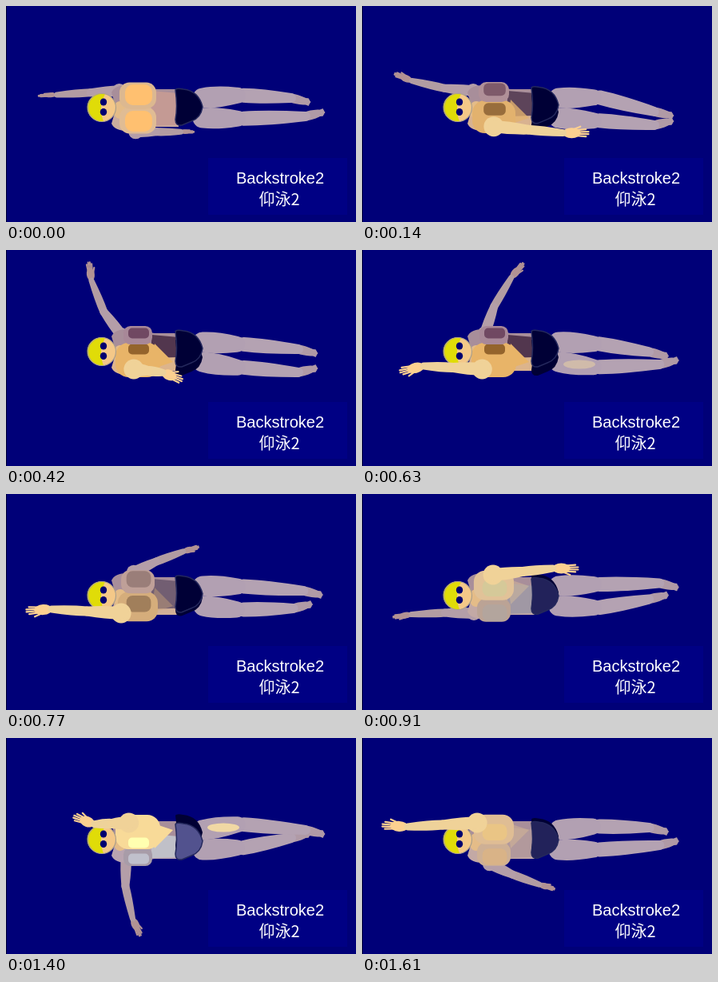
These frames come from a looping animation (438 px wide and 270 px high, 1.68 s). An HTML page:

```html
<!DOCTYPE html>
<html lang="en">
<head>
<meta charset="utf-8">
<title>Backstroke2</title>
<style>
html, body { margin: 0; width: 100%; height: 100%; overflow: hidden; background: #000078; }
svg { display: block; width: 100vw; height: 100vh; }
text { fill: #fff; text-anchor: middle; font-size: 20px; }
</style>
</head>
<body>
<svg viewBox="0 0 438 270">
  <rect width="438" height="270" fill="#000078"/>
  <rect width="1" height="270" fill="#000038"/>
  <rect x="253" y="190" width="174" height="71" fill="#000084"/>
  <text x="343" y="222" font-family="Arial, 'Liberation Sans', sans-serif">Backstroke2</text>
  <text x="342" y="249" font-family="'Noto Sans CJK SC', 'Noto Sans CJK', sans-serif">仰泳2</text>
  <g id="swimmer"></g>
</svg>
<script>
const STEP = 70, COUNT = 24, HALF = 12, TAU = Math.PI * 2;
const swimmer = document.getElementById('swimmer');
const { sin, cos, abs, hypot, min, max, PI } = Math;

// ankle height at every second step
const kick = [115, 132, 117, 124, 130, 125, 117, 106, 97, 102, 115, 109];

const f = n => +n.toFixed(1);
const clamp = (v, lo, hi) => min(hi, max(lo, v));
const bump = (k, at, width) => {
  const d = abs(k - at);
  return max(0, 1 - min(d, COUNT - d) / width);
};
function mix(a, b, u) {
  const part = (h, i) => parseInt(h.substr(1 + i * 2, 2), 16);
  return '#' + [0, 1, 2].map(i =>
    Math.round(part(a, i) + (part(b, i) - part(a, i)) * u).toString(16).padStart(2, '0')).join('');
}

const path = (d, fill, extra = '') => `<path d="${d}" fill="${fill}" ${extra}/>`;
const oval = (x, y, rx, ry, fill, extra = '') =>
  `<ellipse cx="${f(x)}" cy="${f(y)}" rx="${f(rx)}" ry="${f(ry)}" fill="${fill}" ${extra}/>`;
const line = (a, b, w, c) =>
  `<path d="M${a.map(f)}L${b.map(f)}" stroke="${c}" stroke-width="${w}" stroke-linecap="round"/>`;
const pad = (x, y, w, h, fill) =>
  `<rect x="${f(x - w / 2)}" y="${f(y - h / 2)}" width="${f(w)}" height="${f(h)}" rx="${f(min(w, h) * .38)}" fill="${fill}"/>`;
const mirror = s => `<g transform="matrix(1 0 0 -1 0 255)">${s}</g>`;

// point at share u of the way from a to b, moved sideways by s
function along(a, b) {
  const dx = b[0] - a[0], dy = b[1] - a[1], len = hypot(dx, dy) || 1;
  return (u, s = 0) => [f(a[0] + dx * u - dy / len * s), f(a[1] + dy * u + dx / len * s)];
}
function bone(a, b, w, w2, fill) {
  const at = along(a, b), r = w / 2, r2 = w2 / 2, m = (r + r2) / 2 + w * .13;
  return path(`M${at(0, r)}Q${at(.4, m)} ${at(1, r2)}A${r2} ${r2} 0 0 0 ${at(1, -r2)}` +
    `Q${at(.4, -m)} ${at(0, -r)}A${r} ${r} 0 0 0 ${at(0, r)}Z`, fill);
}
function hand(a, b, spread, fill) {
  const at = along(a, b), len = hypot(b[0] - a[0], b[1] - a[1]);
  const [x, y] = at(.32), turn = f(Math.atan2(b[1] - a[1], b[0] - a[0]) * 180 / PI);
  let out = oval(x, y, len * .34, 2.8 + 5 * spread, fill, `transform="rotate(${turn} ${x} ${y})"`);
  for (let i = -1.5; i < 2; i++)
    out += line(at(.45, i * (.7 + 2 * spread)), at(.97 - .05 * i * i, i * (.7 + 3 * spread)), 2.2, fill);
  return out + line(at(.2, 2), at(.65, 2 + 8 * spread), 2.2, fill);
}

// pull below the body as a turning chain, then a foreshortened swing over it
function armPose(k) {
  const x = 152 - 13 * cos(TAU * (k - 2.5) / COUNT);
  const y = 106 - 10 * bump(k, 11.5, 3);
  const reach = 1 - .28 * bump(k, HALF, 2);
  const joints = [[x, y]];
  const add = (dx, dy) => {
    const [px, py] = joints[joints.length - 1];
    joints.push([px + dx, py + dy]);
  };
  if (k <= HALF) {
    const turn = (len, ease) => {
      const angle = PI * 1.02 * (1 - (k / HALF) ** ease);
      add(len * reach * cos(angle), -len * reach * sin(angle));
    };
    turn(36, 1.7);
    turn(42, 1.35);
    turn(24, 1.1);
  } else {
    const w = clamp((k - 15.6) / 6.6, 0, 1), c = cos(PI * w);
    const drop = 2.5 - 3.25 * (1 + c);
    add(43 * reach * c, drop);
    add(44 * reach * c, drop);
    add((c < 0 ? -1 : 1) * (20 + 13 * abs(c)), -10 * sin(PI * w) - 2 * w);
  }
  return joints;
}
function arm(k) {
  const lit = k > HALF, [s, e, w, t] = armPose(k);
  const up = lit ? '#f0d298' : '#b49ea8', fore = lit ? '#eed29a' : '#b29ca2';
  const spread = lit ? .75 : .45 * Math.sqrt(abs(sin(PI * k / HALF)));
  return oval(...s, lit ? 12.5 : 9, lit ? 12.5 : 9, up) +
    hand(w, t, spread, lit ? '#fcd090' : '#b29294') +
    bone(e, w, lit ? 12 : 10, lit ? 9 : 7, fore) +
    bone(s, e, lit ? 15 : 13, lit ? 12 : 10, up);
}
function leg(k) {
  const i = Math.floor(k / 2), u = k / 2 - i;
  const y = kick[i] + (kick[(i + 1) % HALF] - kick[i]) * u;
  const x = 389 - 9 * cos(TAU * k / 8);
  const knee = [297, 113 + 5 * sin(TAU * (k - 1) / COUNT)], ankle = [x - 23, y];
  let out = '';
  for (let n = -2; n < 3; n++)
    out += line(ankle, [x - abs(n), y + 5 + n * 1.7], 2.6, '#b09aa6');
  return out + bone(ankle, [x - 7, y + 4], 11, 9, '#b09aa6') +
    bone(knee, ankle, 18, 12, '#b4a2b2') +
    bone([246, 115], [knee[0] - 7, knee[1]], 25, 20, '#b2a0b2') +
    oval(272, 112, 20, 5.5, '#f0d8a4', `opacity="${bump(k, 20, 2)}"`);
}
function chest(roll, outer, inner) {
  const r = abs(roll);
  return path('M182 106L209 115L186 138Z', outer, `opacity="${f(max(0, roll))}"`) +
    pad(165, 112 + 5.5 * roll, 46 + 10 * roll, 33 + 10 * roll, outer) +
    pad(166, 111 + 13.5 * roll + 6.5 * r * r, 34 - 8 * r, 26 - 13 * r, inner);
}
function trunks(y, fill, extra) {
  return path(`M212 ${y - 21}Q213 ${y - 24} 222 ${y - 22}Q241 ${y - 20} 246 ${y}Q244 ${y + 14} 232 ${y + 18}` +
    `L220 ${y + 23}Q212 ${y + 24} 212 ${y + 16}Q215 ${y} 212 ${y - 21}Z`, fill, extra);
}
function torso(k, roll) {
  const u = (1 + roll) / 2, warm = bump(k, 0, 2);
  const tone = (dark, light, glow) => mix(mix(dark, light, u), glow, warm);
  const side = 'M132 108Q136 99 152 99L186 104L216 104V128H138Z';
  const top = f(106 + 14 * max(0, roll)), low = f(149 + 15 * min(0, roll));
  return path(side, '#a88e9a') + mirror(path(side, mix('#dcb48c', '#b8a4b0', u))) +
    path(`M182 ${top}L216 ${top + 3}V${low}L182 ${low + 1}Z`, tone('#52364e', '#c0c0c8', '#c49a94')) +
    trunks(f(126 - 8 * roll), '#000034') +
    trunks(f(126 + 3 * roll), mix('#000036', '#52528e', max(0, roll)), 'stroke="#24285c" stroke-width="1.5"') +
    oval(143, 130, 9, 11, '#e4bc88') +
    mirror(chest(-roll, tone('#e8b468', '#a89ca8', '#e0bc94'), tone('#94642c', '#c0c0cc', '#ffc070'))) +
    chest(roll, tone('#a88898', '#f8da98', '#dcb890'), tone('#704862', '#ffffb0', '#ffc070'));
}
const head = oval(120, 127, 17.5, 17.5, '#f4c888') +
  path('M124 110A17.5 17.5 0 1 0 122 144Q115 127 124 110Z', '#e0dc08') +
  oval(120, 127, 17.5, 17.5, 'none', 'stroke="#aca08c" stroke-width="1.2"') +
  oval(122, 120, 4.2, 4.5, '#000070') + oval(122, 132.5, 4.2, 4.5, '#000070');

function draw(k) {
  const other = (k + HALF) % COUNT;
  const roll = clamp(-1.6 * sin(TAU * k / COUNT), -1, 1);
  const upper = arm(k), lower = mirror(arm(other));
  const legs = [leg(k), mirror(leg(other))];
  if (k > HALF) legs.reverse();
  const back = (k > HALF ? '' : upper) + (other > HALF ? '' : lower);
  const front = (k > HALF ? upper : '') + (other > HALF ? lower : '');
  swimmer.innerHTML = legs.join('') + back + torso(k, roll) + head + front;
}

let start = null, last = -1;
function tick(now) {
  if (start === null) start = now;
  const k = Math.floor((now - start) / STEP) % COUNT;
  if (k !== last) draw(last = k);
  requestAnimationFrame(tick);
}
draw(0);
requestAnimationFrame(tick);
</script>
</body>
</html>
```
